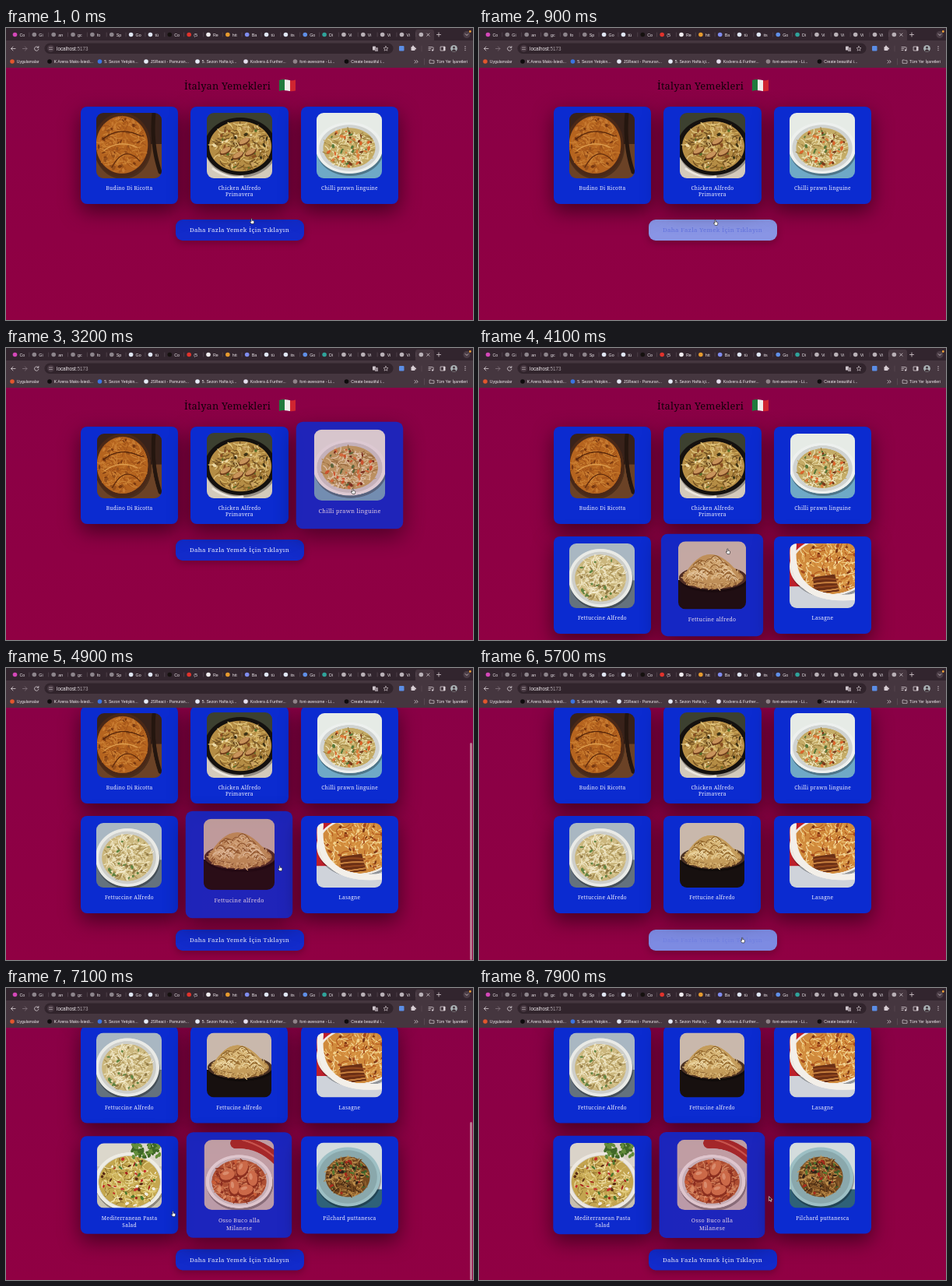
These frames come from a looping animation (600 px wide and 375 px high, 8 s). An HTML page with a canvas:

```html
<!DOCTYPE html>
<html lang="tr">
<head>
<meta charset="utf-8">
<style>
html, body { margin: 0; width: 100%; height: 100%; overflow: hidden; }
#stage { position: relative; width: 600px; height: 375px; overflow: hidden; background: linear-gradient(#8a0046 51px, #900043); }
#stage * { position: absolute; margin: 0; }
#page { left: 0; top: 51px; width: 600px; height: 324px; font: 6.6px/8.2px "Noto Serif", serif; letter-spacing: .3px; }
h1 { left: 229px; top: 13.5px; font: 12.8px/18px "Noto Serif", serif; letter-spacing: .2px; color: #12000a; white-space: nowrap; }
#flag { left: 350px; top: 14px; }
.card { width: 125.3px; height: 125.3px; border-radius: 8px; background: #0b2bd0; box-shadow: 0 9px 26px rgba(0,0,0,.52); color: #f2f2ff; }
.card canvas { left: 20.7px; top: 8.5px; width: 83.6px; height: 83.6px; border-radius: 9px; }
.card p { left: 0; width: 100%; top: 101.4px; text-align: center; white-space: pre; }
#more { left: 217.5px; width: 165px; height: 27px; border-radius: 9px; font-size: 7.8px; line-height: 27px; letter-spacing: .4px; text-align: center; white-space: nowrap; box-shadow: 0 3px 10px rgba(0,0,0,.25); }
#thumb { left: 595.5px; width: 3.5px; border-radius: 2px; background: #b9768f; }
#bar { left: 0; top: 0; }
</style>
</head>
<body>
<div id="stage">
  <div id="page">
    <h1>İtalyan Yemekleri</h1>
    <svg id="flag" width="23" height="18">
      <clipPath id="wave"><path d="M1 2Q6 0 11.500 1.600T22 1.500V15.500Q17 17 11.500 15.600T1 16Z"/></clipPath>
      <g clip-path="url(#wave)"><rect width="8" height="18" fill="#1f7a3d"/><rect x="8" width="7" height="18" fill="#efeeec"/><rect x="15" width="8" height="18" fill="#cf2531"/></g>
    </svg>
    <div id="more">Daha Fazla Yemek İçin Tıklayın</div>
  </div>
  <div id="thumb"></div>
  <svg id="bar" width="600" height="51" font-family="'Liberation Sans', Arial, sans-serif"></svg>
  <svg id="pointer" width="8.5" height="10.2" viewBox="0 0 10 12" stroke-linejoin="round">
    <path id="hand" fill="#fff" stroke="#111" stroke-width=".7" d="M2.600 8.600L.6 5.800Q.3 4.700 1.300 4.900L2.300 5.700V1.300Q2.400.5 3 .5T3.700 1.300V3.600Q6.300 3.500 6.800 4.700V6.800L6 8.800Z"/>
    <path id="arrow" fill="#111" stroke="#fff" stroke-width=".7" d="M.6.6V7.500L2.200 6L3.300 8.600L4.400 8.100L3.300 5.600H5.400Z"/>
  </svg>
</div>
<script>
const $ = id => document.getElementById(id);
const LOOP = 8000, PITCH = 141.5, VIEW = 324;
const clamp = v => Math.max(0, Math.min(1, v));
const smooth = v => (v = clamp(v), v * v * (3 - 2 * v));

// ---------- browser frame ----------
const rect = (x, y, w, h, fill, r = 0) => `<rect x="${x}" y="${y}" width="${w}" height="${h}" rx="${r}" fill="${fill}"/>`;
const dot = (x, y, r, fill) => `<circle cx="${x}" cy="${y}" r="${r}" fill="${fill}"/>`;
const text = (x, y, s, size = 5, fill = '#f0eaee') => `<text x="${x}" y="${y}" font-size="${size}" fill="${fill}">${s}</text>`;
const line = (d, color = '#d8ced4', w = .8) => `<path d="${d}" fill="none" stroke="${color}" stroke-width="${w}" stroke-linecap="round"/>`;

function drawBar() {
  const labels = 'Co Gi an gc fo Sp Go tü Co (5 Re htt Ba tü its Go Di Vi Vi Vi Vi'.split(' ');
  const gray = '#8d858c', blue = '#dfe6f5', globe = '#b9b1b7';
  const icons = ['#d447b8', gray, gray, gray, gray, gray, blue, blue, '#15110f', '#e0332c', '#f0edf0', '#e59a2e', '#7f8cf0', blue, blue, '#5f8fe8', '#2fa39a', globe, globe, globe, globe, globe];
  let s = rect(0, 0, 600, 17, '#32252e') + rect(0, 16, 600, 35, '#45363f') + rect(526, 2, 24, 17, '#45363f', 3);
  icons.forEach((c, i) => {
    const x = 11.5 + 24.85 * i;
    s += dot(x, 8.5, 2.8, c);
    if (labels[i]) s += text(x + 6, 10.5, labels[i], 5.3) + line(`M${x + 18.3} 6V11`, '#6b5d66', .5);
  });
  s += line('M540.700 7L544 10.300M544 7L540.700 10.300') + line('M553.500 8.500H558.500M556 6V11')
    + dot(592, 8.5, 4.5, '#4b3d46') + line('M590.200 7.700L592 9.500L593.800 7.700') + dot(596.3, 4.5, 1.4, '#f0a23a')
    + line('M12 26.500H6.500M9 24L6.500 26.500L9 29') + line('M21.500 26.500H27M24.500 24L27 26.500L24.500 29', '#85777f')
    + line('M41.500 25A2.700 2.700 0 1 0 41.900 27.300M41.900 23.500V25.300H40')
    + rect(49.5, 19.5, 448, 13.5, '#31242c', 6.7) + dot(57.5, 26.3, 4.6, '#45363f')
    + line('M55.500 25H59.500M55.500 27.600H59.500', '#d8ced4', .6)
    + text(65, 28.5, 'localhost<tspan fill="#aba0a7">:5173</tspan>', 6.3)
    + rect(471, 23.5, 4, 5, '#cfc6cc', .6) + rect(474, 25, 4, 5, '#968a92', .6)
    + line('M488 23.300L488.900 25.400L491 25.600L489.400 27L489.900 29.200L488 28L486.100 29.200L486.600 27L485 25.600L487.100 25.400Z', '#d8ced4', .6)
    + rect(505, 23, 6.5, 6.5, '#5b8de6', 1) + rect(520.5, 24, 5, 5, '#d8ced4', .8) + dot(523, 23.7, 1.1, '#d8ced4') + dot(526, 26.5, 1.1, '#d8ced4')
    + line('M534 23V30', '#66565f', .5) + line('M543 24.500H548M543 26.500H546M543 28.500H545M549 25V28.500') + dot(548, 28.6, 1.1, '#d8ced4')
    + line('M558.500 24H564V29H558.500Z') + rect(562, 24, 2.2, 5, '#d8ced4') + dot(575.5, 26.3, 4.4, '#aab3b5') + dot(575.5, 25, 1.5, '#40333a')
    + '<path d="M572.500 29.400Q575.500 25.300 578.500 29.400Q575.500 31.600 572.500 29.400" fill="#40333a"/>';
  for (const y of [24, 26.3, 28.6]) s += dot(590, y, .65, '#d8ced4');
  [[8, '#e2562d', 'Uygulamalar'], [56, '#0d0a0c', 'K Arena Maks-İstedi...'], [120.5, '#3b74e0', '5. Sezon Yetişkin...'],
   [180, '#e6ebf7', 'JSReact - Pamuran...'], [246, '#e6ebf7', '5. Sezon Hafta içi...'], [308, '#e6e0ef', 'Kodvera &amp; Further...'],
   [371.5, '#8f8389', 'font-awesome - Li...'], [437.5, '#0d0a0c', 'Create beautiful i...']]
    .forEach(([x, c, label]) => s += dot(x, 43, 2.8, c) + text(x + 5.7, 44.9, label, 5.15));
  s += line('M525 41.500L526.700 43.200L525 45M527.500 41.500L529.200 43.200L527.500 45') + line('M537.500 39.500V47', '#6b5d66', .5)
    + line('M544.500 41H546.500L547.300 41.800H550V45.300H544.500Z', '#d8ced4', .7) + text(553, 44.9, 'Tüm Yer İşaretleri', 5.1);
  $('bar').innerHTML = s;
}

// ---------- dishes ----------
// name, backdrop top, backdrop bottom, split, plate colour, plate ellipse, food share, food colour, strands, bits, extra
const dishes = [
  ['Budino Di Ricotta', '#38221a', '#6b4226', 40, '#4a2817', [33, 41, 37, 41], .9, '#b5641f', '#c27429 #a3541a #cd8437', '#7a3911 #c87a30 #96501b',
    g => { g.lineWidth = 1.2; stroke(g, '#542409', [8, 34, 30, 16, 58, 30]); stroke(g, '#5f2a0c', [20, 70, 36, 40, 56, 62]); stroke(g, '#e0a050', [10, 48, 30, 34, 52, 44]);
      g.lineWidth = 5; stroke(g, '#24160f', [74, 0, 70, 40, 82, 76]); }],
  ['Chicken Alfredo\nPrimavera', '#3c4030', '#d3cabb', 46, '#14110f', [43, 43, 46, 37], .87, '#b58d45', '#dcbc6b #8f6729 #e3c987 #6a4a20', '#8a4f22 #55712a #c9a064 #edd9a5 #3c3216',
    g => { for (const [x, y] of [[24, 48], [40, 54], [56, 50], [48, 36]]) { oval(g, '#6f3d1c', x, y + 1, 8, 4, -.5); oval(g, '#c8935a', x, y, 7, 3, -.5); }
      g.lineWidth = 3; stroke(g, '#ece6dc', [8, 72, 30, 86, 46, 82]); }],
  ['Chilli prawn linguine', '#e6ebe6', '#6fa9c6', 50, '#edf0ee', [42, 45, 43, 33], .78, '#c4ab66', '#e9dba4 #9c7f3f #f0e6bf #c9b06a', '#d9642b #58783a #dd7d3c #7a3a1a'],
  ['Fettuccine Alfredo', '#a9b7c2', '#64727e', 48, '#e9eae6', [40, 45, 41, 38], .8, '#cbb77e', '#efe4be #a58c50 #f3ebcf #dccb98', '#5f8340 #e9dfb8 #917a45'],
  ['Fettucine alfredo', '#c9b8ac', '#17100f', 48, '#4a3021', [43, 45, 42, 15], .9, '#b08549', '#cfa865 #8f6631 #e0c083', '#c29a58',
    g => { g.fillStyle = '#c49c5b'; g.beginPath(); g.moveTo(6, 44); g.quadraticCurveTo(38, -12, 78, 44); g.quadraticCurveTo(42, 60, 6, 44); g.fill();
      g.lineWidth = 1.2;
      for (let i = 0; i < 130; i++) { const u = rnd() * 2 - 1, x = 40 + u * 28, y = 46 - rnd() * 28 * (1 - u * u); stroke(g, ['#dcbc7d', '#94692f', '#ecd7a5'][i % 3], [x - 5, y + 2, x, y - 6, x + 6, y + 2]); } }],
  ['Lasagne', '#bd1f2b', '#cfd3da', 56, '#efeae4', [52, 30, 52, 38], .94, '#d08a3c', '#f0c878 #b4591f #f4dca2 #dd9a48', '#a3481b #f3d18a #7a3413',
    g => { g.fillStyle = '#6b2f15'; g.beginPath(); g.moveTo(30, 44); g.lineTo(58, 40); g.lineTo(64, 62); g.lineTo(32, 66); g.fill();
      for (let i = 0; i < 4; i++) { g.lineWidth = 2; stroke(g, i % 2 ? '#c98240' : '#93481e', [30, 48 + i * 5, 44, 44 + i * 6, 62, 47 + i * 4]); }
      g.lineWidth = 8; stroke(g, '#f3efe9', [5, 2, -2, 80, 90, 69]); }],
  ['Mediterranean Pasta\nSalad', '#dcd8cc', '#c9c3b2', 30, '#efede5', [42, 50, 45, 38], .88, '#c5a850', '#ecd98c #9a7c32 #f1e5ad #d6bd66', '#a51e1b #4d7a2b #f3eee0 #5a2c14 #c4302a',
    g => { for (let i = 0; i < 50; i++) oval(g, i % 2 ? '#3f6a26' : '#648f3b', 46 + rnd() * 36, 1 + rnd() * 17, 3, 2, rnd() * 3); }],
  ['Osso Buco alla\nMilanese', '#c9b6b3', '#c3b3b8', 34, '#ece5e3', [42, 50, 40, 32], .82, '#b25a30', '#cf7a48 #8a3a1c #dd9a66', '#d26c37 #e8a06a #8f351a',
    g => { g.lineWidth = 13; stroke(g, '#a92d26', [38, 4, 66, 2, 88, 24]); g.lineWidth = 2; stroke(g, '#d2604f', [46, 0, 68, 6, 84, 20]);
      for (const [x, y] of [[28, 42], [46, 34], [58, 46], [36, 56], [50, 60]]) { oval(g, '#8c371a', x, y + 2, 10, 7, x); oval(g, '#d57a49', x, y, 9, 6, x); oval(g, '#e6a274', x - 2, y - 2, 4, 2, x); } }],
  ['Pilchard puttanesca', '#d3dcdd', '#2f6178', 60, '#9dbfc4', [40, 44, 42, 38], .68, '#75491f', '#b98845 #4a2c14 #c79a58 #8f6230', '#a52b1c #3f5f2b #2f2118 #56762f']
];

let seed;
const rnd = () => (seed = seed * 16807 % 2147483647) / 2147483647;

function stroke(g, color, [x, y, cx, cy, x2, y2]) {
  g.strokeStyle = color;
  g.beginPath(); g.moveTo(x, y); g.quadraticCurveTo(cx, cy, x2, y2); g.stroke();
}
function oval(g, color, x, y, rx, ry, turn = 0) {
  g.fillStyle = color;
  g.beginPath(); g.ellipse(x, y, rx, ry, turn, 0, 7); g.fill();
}
function paintDish(g, [, top, low, split, plate, [cx, cy, rx, ry], share, base, strands, bits, extra], i) {
  seed = 4001 + 977 * i;
  g.scale(2, 2);
  g.lineCap = 'round';
  g.fillStyle = top; g.fillRect(0, 0, 84, 84);
  g.fillStyle = low; g.fillRect(0, split, 84, 84);
  oval(g, 'rgba(0,0,0,.3)', cx + 1, cy + 3, rx, ry);
  oval(g, plate, cx, cy, rx, ry);
  oval(g, 'rgba(0,0,0,.12)', cx, cy, rx * .9, ry * .9);
  oval(g, base, cx, cy, rx * share, ry * share);
  const spot = () => {
    const a = rnd() * 6.28, r = Math.sqrt(rnd()) * share * .92;
    return [cx + Math.cos(a) * r * rx, cy + Math.sin(a) * r * ry];
  };
  const lines = strands.split(' '), dots = bits.split(' ');
  g.lineWidth = 1.1;
  for (let n = 0; n < 200; n++) {
    const [x, y] = spot(), a = rnd() * 6.28, dx = Math.cos(a) * 5, dy = Math.sin(a) * 4;
    stroke(g, lines[n % lines.length], [x - dx, y - dy, x + dy / 2, y - dx / 2, x + dx, y + dy]);
  }
  for (let n = 0; n < 45; n++) oval(g, dots[n % dots.length], ...spot(), 1.2 + rnd() * 2, .8 + rnd() * 1.2, rnd() * 3);
  if (extra) extra(g);
}

const cards = dishes.map((dish, i) => {
  const card = document.createElement('div'), photo = document.createElement('canvas'), label = document.createElement('p');
  card.className = 'card';
  card.style.left = 95.8 + PITCH * (i % 3) + 'px';
  card.style.top = 49.5 + PITCH * Math.floor(i / 3) + 'px';
  photo.width = photo.height = 168;
  paintDish(photo.getContext('2d'), dish, i);
  label.textContent = dish[0];
  card.append(photo, label);
  $('page').append(card);
  return card;
});

// ---------- motion ----------
const path = [[0, 316, 248], [900, 304, 250], [1150, 296, 222], [1500, 288, 180], [1750, 240, 170], [1900, 205, 168], [2300, 176, 172],
  [2500, 200, 175], [2850, 370, 182], [3200, 446, 184], [3450, 430, 190], [3700, 330, 255], [3950, 312, 262], [4300, 330, 260],
  [4900, 352, 257], [5200, 350, 280], [5450, 340, 348], [5800, 338, 350], [6150, 338, 320], [6300, 338, 311], [6900, 330, 300],
  [7100, 215, 290], [7500, 200, 285], [7640, 229, 282], [7900, 375, 271], [8000, 378, 270]];
const BUTTON = 9;
// hovered item, from, to
const hovers = [[BUTTON, 0, 1000], [1, 1150, 1750], [0, 1850, 2500], [1, 2560, 2830], [2, 2880, 3560], [BUTTON, 3700, 3950], [4, 3950, 5330],
  [BUTTON, 5430, 5800], [7, 5800, 6165], [4, 6180, 6480], [7, 6550, 7050], [6, 7090, 7635], [7, 7640, 7900]];
const pulse = (t, a, b) => Math.max(0, clamp((Math.min(t, b) - a) / 300) - clamp((t - b) / 300));

function pointerAt(t) {
  const k = Math.max(1, path.findIndex(p => p[0] > t));
  const [a, x, y] = path[k - 1], [b, x2, y2] = path[k], f = (t - a) / (b - a);
  return [x + (x2 - x) * f, y + (y2 - y) * f];
}

function draw(now) {
  const t = now % LOOP;
  const rows = 1 + (t >= 3950) + (t >= 5800);
  const scroll = 52 * smooth((t - 4200) / 400) + PITCH * smooth((t - 6350) / 550);
  const glow = Array(10).fill(0);
  for (const [i, a, b] of hovers) glow[i] = Math.min(1, glow[i] + pulse(t, a, b));

  $('page').style.transform = `translateY(${-scroll}px)`;
  cards.forEach((card, i) => {
    card.style.display = i < rows * 3 ? '' : 'none';
    card.style.transform = `scale(${1 + .1 * glow[i]})`;
    card.style.opacity = 1 - .16 * glow[i];
  });
  const more = $('more').style, lit = glow[BUTTON];
  more.top = 195 + PITCH * (rows - 1) + 'px';
  more.background = `color-mix(in srgb, #fff ${50 * lit}%, #122bcb)`;
  more.color = `color-mix(in srgb, #122bcb ${64 * lit}%, #f4f4ff)`;

  const max = [1, 52, 193.5][rows - 1], size = VIEW * VIEW / (VIEW + max), thumb = $('thumb').style;
  thumb.height = size + 'px';
  thumb.top = 51 + scroll / max * (VIEW - size) + 'px';
  thumb.opacity = pulse(t, 4200, 5300) + pulse(t, 6350, 7300);

  const [x, y] = pointerAt(t), over = hovers.some(([, a, b]) => t >= a && t < b);
  $('pointer').style.transform = `translate(${x - 3}px, ${y - 3.9}px)`;
  $('hand').style.display = over ? '' : 'none';
  $('arrow').style.display = over ? 'none' : '';
  requestAnimationFrame(draw);
}

drawBar();
requestAnimationFrame(draw);
</script>
</body>
</html>
```
